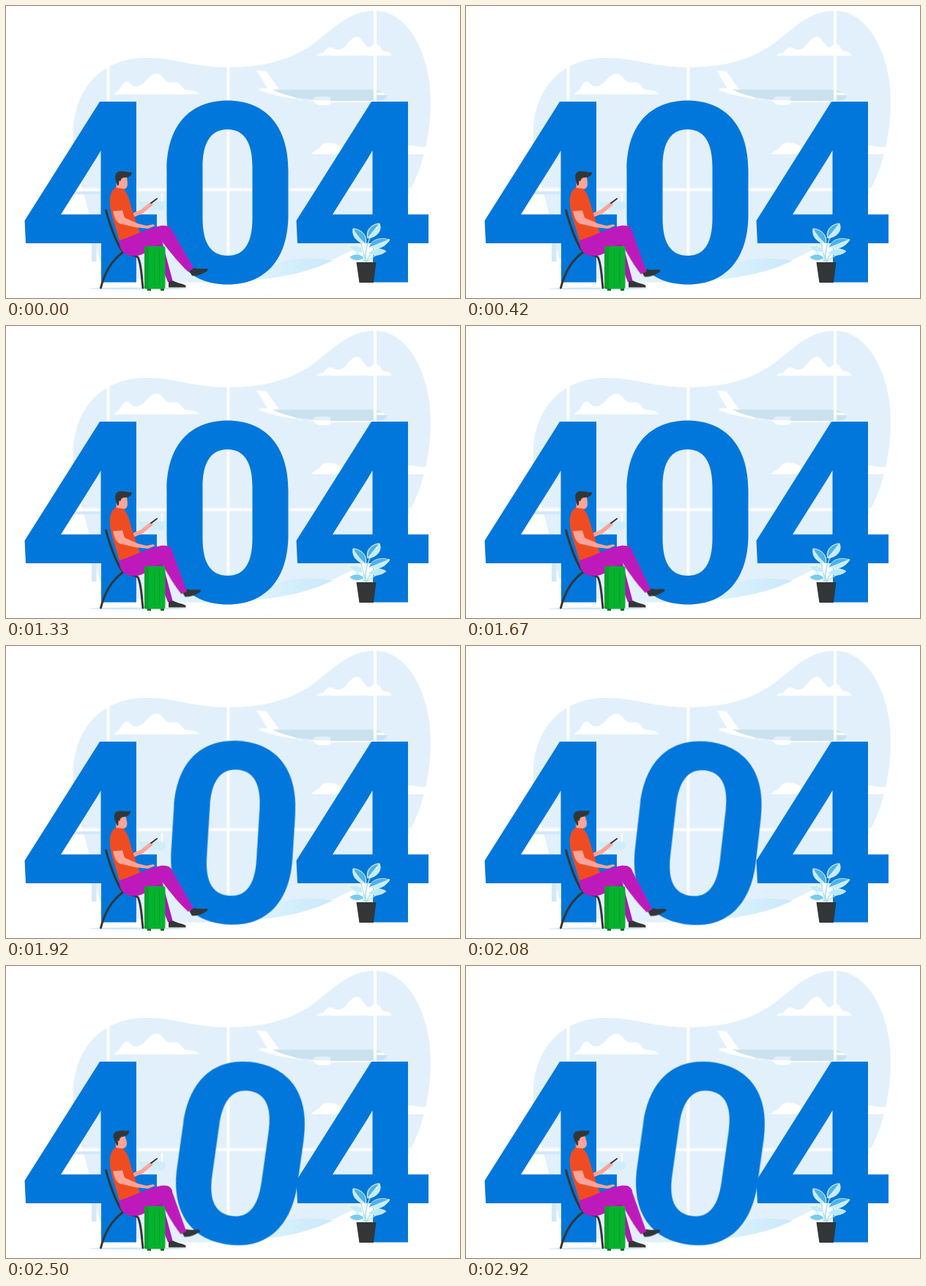
These frames come from a looping animation (620 by 400 pixels, 3.01 s). An HTML page:

```html
<!DOCTYPE html>
<html lang="en">
<head>
<meta charset="utf-8">
<title>404</title>
<style>
  html, body { margin: 0; width: 100%; height: 100%; overflow: hidden; background: #fff; }
  svg { display: block; width: 100vw; height: 100vh; }

  .zero, .head, .shin, .shoe { animation: 3010ms ease infinite both; }
  .zero { transform-origin: 302.5px 382px; animation-name: topple; }
  .head { transform-origin: 153px 250px; animation-name: look-up; }
  .shin { transform-origin: 224px 306px; animation-name: swing; }
  .shoe { animation-name: tap; }

  @keyframes topple {
    0%, 58.1% { transform: rotate(0deg); }
    79.7%, 100% { transform: rotate(8deg); }
  }
  @keyframes look-up {
    0%, 58.1% { transform: rotate(0deg); }
    74.8%, 100% { transform: rotate(-9deg); }
  }
  @keyframes swing {
    0%, 33.2%, 66.4% { transform: rotate(0deg); }
    16.6%, 49.8%, 83.1%, 100% { transform: rotate(10deg); }
  }
  @keyframes tap {
    0%, 33.2%, 66.4% { transform: translate(0, 0); }
    16.6%, 49.8%, 83.1%, 100% { transform: translate(-10.5px, 1.5px); }
  }
</style>
</head>
<body>
<svg viewBox="0 0 620 400" preserveAspectRatio="none">
  <defs>
    <path id="four" fill-rule="evenodd" d="M128 131H178V285.500H206V325H178V378.500H130V325H27L25.500 294ZM129.500 198L123 209L75 285.500H129.500Z"/>
    <linearGradient id="floor" x1="0" x2="1">
      <stop stop-color="#e1f4fd"/>
      <stop offset="1" stop-color="#c9e9fb"/>
    </linearGradient>
  </defs>

  <!-- window and sky -->
  <path fill="#e2f0fc" d="M92 174C92 116 128 73 188 71C228 70 255 84 301 84C346 84 379 77 412 57C443 37 464 6.500 504 6.500C549 6.500 580 66 580 130C580 215 545 297 470 336C430 357 385 372 330 376C270 380 200 381 150 368C124 360 124 330 116 298C110 260 92 228 92 174Z"/>
  <g stroke="#fff" stroke-width="4" fill="none">
    <path d="M139.500 80V340M303.500 80V345M504 4V345"/>
    <path d="M98 251.500H566"/>
  </g>
  <g fill="#fff">
    <path d="M148 121C151 116 154 117 157 111C160 105 163 102 167 104C171 107 172 111 178 110C184 110 187 106 191 102C196 97 200 92.500 206 92.500C213 93 215 101 221 104C227 107 231 102 236 106C241 110 242 115 248 115C255 115 261 117 264 121Z"/>
    <path d="M424 68C426 64 430 66 434 63C438 58 442 55 447 58C452 61 457 61 461 57C467 51 473 42 479 42C486 43 488 52 494 56C498 58 500 52 506 52C512 53 512 62 518 62C523 62 525 65 527 68Z"/>
    <path d="M417 203C421 197 426 198 430 192C434 186 441 187 447 188C453 189 458 194 463 194H535C551 187 560 195 579 193L580 203Z"/>
  </g>

  <!-- plane -->
  <path fill="#fff" d="M342 88L356 90L373 114L400 129H502L503 132H444C443 135 440 136 434 136C425 136 420 133 419 130C396 128 364 123 345 115C346 112 352 112 357 113Z"/>
  <path fill="#cae2ee" d="M364 114.500H498C509 115 520 119 520 124C520 128 512 130 502 130H443V124H426C422 124 420 126 419 128C395 127 377 121 364 114.500Z"/>
  <path fill="#fff" d="M506 118.500H515L519 122H507Z"/>
  <path stroke="#fff" stroke-width="4" d="M504 100V132"/>

  <!-- floor and far seats -->
  <path fill="url(#floor)" d="M322 376C350 363 372 346 404 346C425 345 440 348 446 349C415 363 382 373 322 376Z"/>
  <path fill="#d3e8f8" d="M117 325H123.500V350H117ZM88 254H128V258H88Z"/>
  <path fill="#d0eefa" d="M182 268H218V276Q216 280 211 280H189Q182 278 182 268Z"/>
  <path stroke="#fff" stroke-width="2" d="M213 256V268"/>

  <!-- digits -->
  <g fill="#0277db">
    <use href="#four"/>
    <use href="#four" x="371"/>
    <path class="zero" fill-rule="evenodd" d="M302.500 129.500C355 129.500 385.500 165 385.500 225V286C385.500 345 356 381.500 303 381.500C249 381.500 219.500 345 219.500 286V225C219.500 165 250 129.500 302.500 129.500ZM302.500 169C279 169 268.500 188 268.500 221V290C268.500 324 279 342 303 342C326 342 336.500 324 336.500 290V221C336.500 188 326 169 302.500 169Z"/>
  </g>

  <!-- traveller -->
  <ellipse cx="181" cy="387" rx="68" ry="1.300" fill="#cfe7f8"/>
  <g fill="none" stroke="#333638" stroke-width="3" stroke-linecap="round">
    <path d="M136.500 280C142 300 149 320 157 333C163 341 174 340 180 344C185 353 185 370 187 386"/>
    <path d="M160 337C145 348 135 364 129.500 386"/>
  </g>
  <path fill="#fba498" d="M168 286L184 279L197 269L201 269L200 273L187 284L170 291Z"/>
  <path stroke="#333638" stroke-width="2" stroke-linecap="round" d="M198 270L206 264"/>

  <path fill="#a91bae" d="M186 320L212 318L228 378H221L207 341L186 338Z"/>
  <path fill="#333638" d="M222 377L229 376.500C234 380 242 380 245.500 383V385.500H222Z"/>

  <g class="head">
    <path fill="#fba498" d="M151 241L156 233L165 234L166 243C166 248 164 251 159 251L159 255L150 253Z"/>
    <path fill="#333638" d="M150.500 240C148 234 149 229 153 227C158 225 164 228 172 228C172 232 168 235 163 235C158 235 157 237 156.500 240L154.500 239L154 245L152 246Z"/>
  </g>
  <path fill="#f04c22" d="M150 249L159 250C164 254 167 260 169 268C173 282 177 294 181 306L184 312L155 322C152 309 146 295 143 279C140 263 143 252 150 249Z"/>
  <path fill="#fba498" d="M146 281L159 280L162 290L180 298L192 301L201 299L204 301L194 305L176 303L155 298C149 294 148 288 146 281Z"/>

  <path class="shoe" fill="#333638" d="M250.500 363L257 359C264 361 270 359 275 360Q277 362 273 364C266 368 260 370 254 369.500Z"/>
  <path class="shin" fill="#be1abb" d="M211 305C216 301 223 301 226 306L256 359L249 364C233 349 221 333 211 320Z"/>
  <path fill="#be1abb" d="M155 321C170 317 185 308 207 302C218 299 225 302 227 308C227 316 218 324 207 327L190 338C183 343 167 345 160 337C156 333 155 328 155 321Z"/>

  <!-- suitcase -->
  <path fill="#056d1c" d="M193 386H198V390H193ZM211 386H216V390H211Z"/>
  <rect x="189" y="329" width="28.500" height="58.500" rx="3" fill="#06b22e"/>
  <path fill="#05a029" d="M192 329H195V387.500H192Q189 387.500 189 384.500V332Q189 329 192 329Z"/>
  <path stroke="#05a029" d="M202.500 334V383M209.500 334V383"/>

  <!-- plant -->
  <g stroke="#fff" stroke-width=".7">
    <path fill="none" stroke="#a8dff6" stroke-width="1.500" d="M492 352C489 338 494 322 502 308M491 350L483 317M492 350C497 339 508 328 520 321M490 350L475 333M493 350L511 337"/>
    <path fill="#c4edfb" d="M494 318C491 308 498 299 510 298C514 307 507 317 494 318Z"/>
    <path fill="#4db2e8" d="M494 318C492 308 498 299 510 298Z"/>
    <path fill="#c4edfb" d="M491 326C479 324 472 315 474 305C486 306 494 315 491 326Z"/>
    <path fill="#4db2e8" d="M491 326C484 320 478 313 474 305C486 306 494 315 491 326Z"/>
    <path fill="#4db2e8" d="M495 331C499 320 510 316 524 320C519 329 507 335 495 331Z"/>
    <path fill="#c4edfb" d="M495 331C505 328 514 323 524 320C519 329 507 335 495 331Z"/>
    <path fill="#c4edfb" d="M489 337C482 339 473 336 468 329C478 326 487 330 489 337Z"/>
    <path fill="#79cbef" d="M489 345C483 338 475 339 469 344C474 350 484 350 489 345Z"/>
    <path fill="#b9e9fb" d="M494 339C502 331 511 331 519 336C512 342 502 343 494 339Z"/>
  </g>
  <path fill="#333638" d="M478.500 351H505.500L502 379H482.500Z"/>
</svg>
</body>
</html>
```
